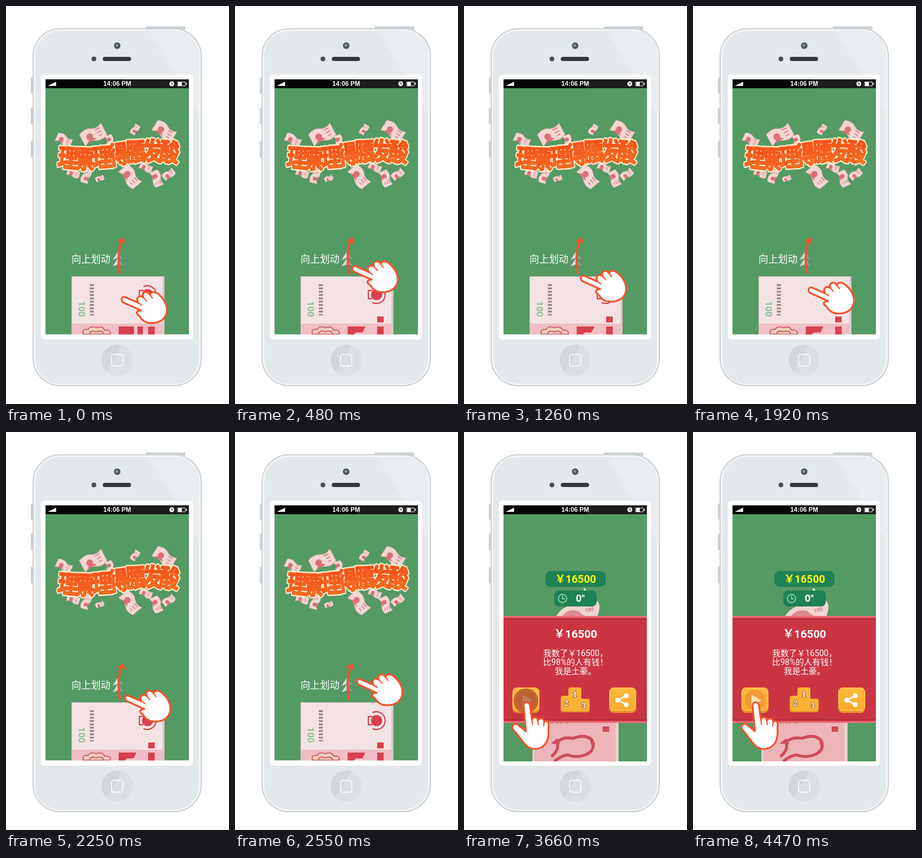
An HTML page that plays this animation: 378x673 px, repeating every 4.5 s.

```html
<!DOCTYPE html>
<html lang="zh-CN">
<head>
<meta charset="utf-8">
<style>
html, body { margin: 0; width: 100%; height: 100%; overflow: hidden; background: #fff; }
svg { display: block; width: 378px; height: 673px; }
text { font-family: Roboto, "Noto Sans CJK SC", "Noto Sans CJK", sans-serif; }
.mid { text-anchor: middle; }
.bold { font-weight: 700; }
.serif text { font-family: "Noto Serif", serif; }
.hand { fill: #fff; stroke: #f4512c; stroke-width: 3; stroke-linejoin: round; stroke-linecap: round; }
.title { font-size: 34px; font-weight: 900; text-anchor: middle; stroke-linejoin: round; }
.rim { fill: #fff0cf; stroke: #fff0cf; stroke-width: 5; }
.face { fill: url(#letterFill); stroke: #f45c1c; stroke-width: 1.5; }
</style>
</head>
<body>
<svg viewBox="0 0 378 673">
  <defs>
    <linearGradient id="homeFill" x2="1" y2=".6"><stop offset=".5" stop-color="#d1d7da"/><stop offset=".5" stop-color="#dbe0e3"/></linearGradient>
    <linearGradient id="buttonFill" x2="0" y2="1"><stop stop-color="#fcb93f"/><stop offset="1" stop-color="#f9a92e"/></linearGradient>
    <linearGradient id="letterFill" x2="0" y2="1"><stop offset=".2" stop-color="#f4521c"/><stop offset="1" stop-color="#f7801f"/></linearGradient>
    <clipPath id="screen"><path d="M67 124H310V557H67Z"/></clipPath>
    <g id="note">
      <path d="M-18-10Q-6-15 1-10T18-10V9Q8 14 0 9T-18 9Z" fill="#f3d6d2" stroke="#d8aaa4" stroke-width=".8"/>
      <circle cx="-6" r="5" fill="#db6f74"/><path d="M-13 7Q-6-1 2 7Z" fill="#db6f74"/>
      <path d="M5-5h8M6 0h7M7 5h5" stroke="#d98084" stroke-width="1.6"/>
    </g>
    <g id="tile">
      <rect y="2" width="46" height="41" rx="8" fill="#e88f2b"/>
      <rect width="46" height="40" rx="8" fill="url(#buttonFill)"/>
      <rect x="1.5" y="1.5" width="43" height="37" rx="7" fill="none" stroke="#fdcb68"/>
    </g>
  </defs>

  <!-- phone -->
  <g fill="#cbd1d4">
    <rect x="237" y="34.5" width="67" height="6" rx="1"/>
    <rect x="42" y="121" width="6" height="27" rx="1"/>
    <rect x="42" y="172" width="6" height="28" rx="1"/>
    <rect x="42" y="228" width="6" height="28" rx="1"/>
  </g>
  <rect x="46" y="38.5" width="285" height="603.500" rx="46" fill="#f6f8f8" stroke="#cbd0d3" stroke-width="2"/>
  <rect x="49.500" y="42" width="278" height="597" rx="42" fill="#e3e8eb"/>
  <path d="M242 42H285Q327.500 42 327.500 84V184Z" fill="#e9edef"/>
  <circle cx="188.500" cy="67" r="5.500" fill="#4b545b"/><circle cx="188" cy="66.500" r="2.500" fill="#83929d"/>
  <circle cx="149" cy="89.500" r="4" fill="#4a4f54"/>
  <rect x="164" y="86" width="48" height="7" rx="3.500" fill="#34383b"/>
  <circle cx="188.500" cy="599" r="26.500" fill="url(#homeFill)"/>
  <rect x="179" y="589" width="19" height="20" rx="4" fill="none" stroke="#fff" stroke-width="1.5"/>
  <rect x="59" y="116" width="258" height="448" rx="6" fill="#fff"/>

  <g clip-path="url(#screen)">
    <g id="swipePage">
      <path d="M67 124H310V555.500H67Z" fill="#549a63"/>
      <g id="notes"></g>
      <g id="title" class="title"></g>
      <text x="111" y="434" font-size="16.500" font-weight="500" fill="#fff">向上划动</text>
      <g stroke="#66736a" stroke-width=".6">
        <path d="M190 414L180 430L190 426ZM190 425L180 441L190 437Z" fill="#d7dfd9"/>
        <path d="M190 414L201 430L190 426ZM190 425L201 441L190 437Z" fill="#8d9b92"/>
      </g>
      <path d="M193 453Q188 418 196 396" fill="none" stroke="#f4512c" stroke-width="3.500"/>
      <path d="M188 398L199 391L203 403L196 399Z" fill="#f4512c"/>

      <path d="M114 457H268.500V555.500H114Z" fill="#ecd3d3"/>
      <path d="M268.500 459V555.500M266 457V555.500" stroke="#b9a9a0"/>
      <path d="M111 457H265.500V555.500H111Z" fill="#f4e3e4"/>
      <path d="M111.500 555.500V457.500H265" fill="none" stroke="#cdbfb5"/>
      <path d="M112 537H265V555.500H112Z" fill="#f0bec4"/>
      <text class="bold" transform="translate(122.500 499) rotate(90)" font-size="15.500" fill="#8fc096">100</text>
      <path d="M145.500 470.500V523" stroke="#95867f" stroke-width="7" stroke-dasharray="3 2.600"/>
      <path d="M131 555Q129 545 139 547Q144 540 153 544Q164 540 167 548Q178 547 177 555Z" fill="#edcdb9" stroke="#cc4c57" stroke-width="1.500"/>
      <path d="M141 555Q144 547 153 551Q163 547 166 555" fill="none" stroke="#cc4c57" stroke-width="1.500"/>
      <g fill="#d8404f">
        <path d="M233 474.500A15 15 0 1 1 233 501.500M233 481H226V495H233" fill="none" stroke="#d8404f" stroke-width="2"/>
        <circle cx="240" cy="488" r="9.500"/>
        <path id="printA" d="M191 542H217V556H191ZM223 542H232V556H223ZM241 542H252V556H241Z"/>
        <path id="printB" d="M191 542H221L216 552H205L201 556H191ZM241 525H252V535H241ZM241 542H252V556H241Z"/>
      </g>
      <path d="M67 555.500H310V558H67Z" fill="#fff"/>
      <g id="swipeHand" class="hand">
        <path d="M6-5L29 5C24-3 31-9 38-4C34-12 43-17 49-9C53-17 62-12 68-5C75 2 80 14 77 23C74 34 63 40 50 39C40 39 35 34 31 27C24 23 26 18 34 18L5 5C-1 2 0-6 6-5Z"/>
        <path d="M29 5L35 9M38-4L43 2M49-9L53-3" fill="none" stroke-width="2"/>
      </g>
    </g>

    <g id="resultPage">
      <path d="M67 124H310V557H67Z" fill="#549a63"/>
      <g transform="translate(197 300) rotate(-12)">
        <path d="M-44 4Q-26-14-10-8Q12-1 28-12Q36-5 32 6L24 22H-44Z" fill="#f0d5d2"/>
        <path d="M-38 10Q-22-8-4 2L8 16H-38Z" fill="#dc8b91"/>
        <text x="7" y="7" class="bold" font-size="9" fill="#d27c82">100</text>
      </g>
      <g fill="#1f8156">
        <rect x="138" y="235" width="102" height="27" rx="9"/>
        <rect x="153" y="268" width="72" height="27" rx="8"/>
      </g>
      <text class="mid bold" x="189" y="255" font-size="18" fill="#ff0">￥16500</text>
      <g fill="none" stroke="#7fcf9f" stroke-width="1.800"><circle cx="167" cy="281.500" r="7"/><path d="M167 277V282H171"/></g>
      <text class="mid bold" x="197" y="287" font-size="17" fill="#fff">0"</text>
      <path d="M203 263L208 268H203Z" fill="#e9f3ec"/>

      <path d="M116 490H262V557H116Z" fill="#e7d5ca"/>
      <path d="M119 490H257V557H119Z" fill="#edb5b9"/>
      <path d="M148 493q6-5 12 0m3 0q6-5 12 0" fill="none" stroke="#93804a" stroke-width="2"/>
      <path d="M235 498H246V507H235Z" fill="#ce4b58"/>
      <path d="M148 549Q162 538 158 525Q166 515 185 518Q206 510 217 521Q224 537 208 545Q190 552 176 546Q165 547 153 557" fill="none" stroke="#ce4d5b" stroke-width="5"/>
      <path d="M147 527L158 518L163 528ZM213 519L222 526L218 537Z" fill="#ce4d5b"/>

      <path d="M67 311H310V492H67Z" fill="#cb3542"/>
      <path d="M67 312.500H310M67 490.500H310" stroke="#ed6d78" stroke-width="3"/>
      <path d="M67 317H310M67 486H310" stroke="#b72d3a" stroke-width="2"/>
      <g class="mid" fill="#fff">
        <text class="bold" x="189" y="348" font-size="19">￥16500</text>
        <g font-size="14">
          <text x="189" y="379">我数了￥16500，</text>
          <text x="189" y="394">比98%的人有钱！</text>
          <text x="189" y="409">我是土豪。</text>
        </g>
      </g>

      <use href="#tile" x="82" y="432"/>
      <circle cx="105" cy="453" r="17" fill="#f19a35"/>
      <path d="M99 444L116 454L99 463Z" fill="#fde3b4"/>
      <circle id="press" cx="105" cy="454.500" fill="#a0432f"/>

      <path id="podium" d="M181 432H196Q199 432 199 435V451H210Q213 451 213 455V468Q213 472 209 472H168Q164 472 164 468V450Q164 446 168 446H177V436Q177 432 181 432Z" fill="#e88f2b" transform="translate(0 2)"/>
      <path d="M181 432H196Q199 432 199 435V451H210Q213 451 213 455V468Q213 472 209 472H168Q164 472 164 468V450Q164 446 168 446H177V436Q177 432 181 432Z" fill="#fbb238"/>
      <g class="mid bold serif" font-size="13" fill="#fff" stroke="#b56a20" stroke-width="2" paint-order="stroke">
        <text x="188" y="448">1</text>
        <text x="173.500" y="463">2</text>
        <text x="203" y="467">3</text>
      </g>
      <use href="#tile" x="246" y="432"/>
      <path d="M275 446L261 453.500L275 461" fill="none" stroke="#fff" stroke-width="2.500"/>
      <g fill="#fff"><circle cx="275" cy="446" r="4.300"/><circle cx="261" cy="453.500" r="4.300"/><circle cx="275" cy="461" r="4.300"/></g>

      <g class="hand">
        <path d="M101 463C101 455 111 455 112 463L115 486C119 480 125 482 125 488C130 481 136 485 136 490C142 486 145 492 143 499C144 511 143 521 138 527C131 537 117 538 109 533C99 526 94 514 84 504C78 496 87 490 94 497L105 506Z"/>
        <path d="M115 486L116 494M125 488L126 495M136 490L135 497" fill="none" stroke-width="2"/>
      </g>
    </g>

    <path d="M67 124H310V139H67Z" fill="#050505"/>
    <path d="M201 124H310V139H208Z" fill="#1d1d1d"/>
    <path d="M71 135L85 128V135Z" fill="#fff"/>
    <text class="mid bold" x="188.500" y="135" font-size="10.800" fill="#fff" style="font-family:'Liberation Sans',sans-serif">14:06 PM</text>
    <circle cx="281" cy="131.500" r="4" fill="#fff"/><path d="M281 129V132H283" fill="none" stroke="#111"/>
    <path d="M291 128.500H304V135H291Z" fill="none" stroke="#ddd"/><path d="M292 129H298V135H292ZM305 130h1.500v3h-1.500Z" fill="#fff"/>
  </g>
</svg>
<script>
const LOOP = 4500, RESULT_AT = 2580, PRESS_PERIOD = 540;
const byId = id => document.getElementById(id);
const show = (id, on) => { byId(id).style.display = on ? "" : "none"; };

// x, y, angle, scale
byId("notes").innerHTML = [
  [98, 227, 25, .75], [148, 218, -28, 1.15], [176, 229, 70, .6], [219, 209, -60, .5],
  [268, 212, 32, 1.05], [114, 283, 15, .6], [136, 288, -75, .65], [159, 292, -25, .4],
  [210, 289, 50, 1.05], [237, 273, 20, .6], [255, 292, 65, .75], [276, 285, -40, .6]
].map(([x, y, angle, scale]) =>
  `<use href="#note" transform="translate(${x} ${y}) rotate(${angle}) scale(${scale})"/>`).join("");

// center x, center y, angle of each title character
const spots = [[105, 257, 6], [134, 259, 2], [163, 256, -4], [191, 251, -8], [220, 246, -4], [248, 245, 2], [277, 247, 6]];
const lettering = style => [..."理票理得腰发酸"].map((char, i) => {
  const [x, y, angle] = spots[i];
  return `<text class="${style}" transform="translate(${x} ${y}) rotate(${angle}) scale(1 1.25)" y="12.5">${char}</text>`;
}).join("");
byId("title").innerHTML = lettering("rim") + lettering("face");

// time, fingertip x, fingertip y
const swipes = [
  [0, 195, 497], [480, 198, 445], [540, 199, 436], [780, 200, 397],
  [900, 195, 497], [1260, 197, 461], [1620, 200, 415], [1740, 206, 392],
  [1830, 195, 492], [1920, 195, 481], [2550, 206, 423], [RESULT_AT, 206, 420]
];

function fingertip(t) {
  const next = swipes.findIndex(key => key[0] > t);
  const [t0, x0, y0] = swipes[next - 1], [t1, x1, y1] = swipes[next];
  const k = (t - t0) / (t1 - t0);
  return [x0 + (x1 - x0) * k, y0 + (y1 - y0) * k];
}

function draw() {
  const t = performance.now() % LOOP, result = t >= RESULT_AT;
  show("swipePage", !result);
  show("resultPage", result);
  if (result) {
    const pulse = .5 + .5 * Math.cos((t - 3660) / PRESS_PERIOD * 2 * Math.PI);
    byId("press").setAttribute("r", 17 + 4 * pulse);
    byId("press").setAttribute("opacity", .65 * pulse);
  } else {
    show("printA", t < 60);
    show("printB", t >= 60);
    byId("swipeHand").setAttribute("transform", `translate(${fingertip(t)})`);
  }
  requestAnimationFrame(draw);
}
draw();
</script>
</body>
</html>
```
